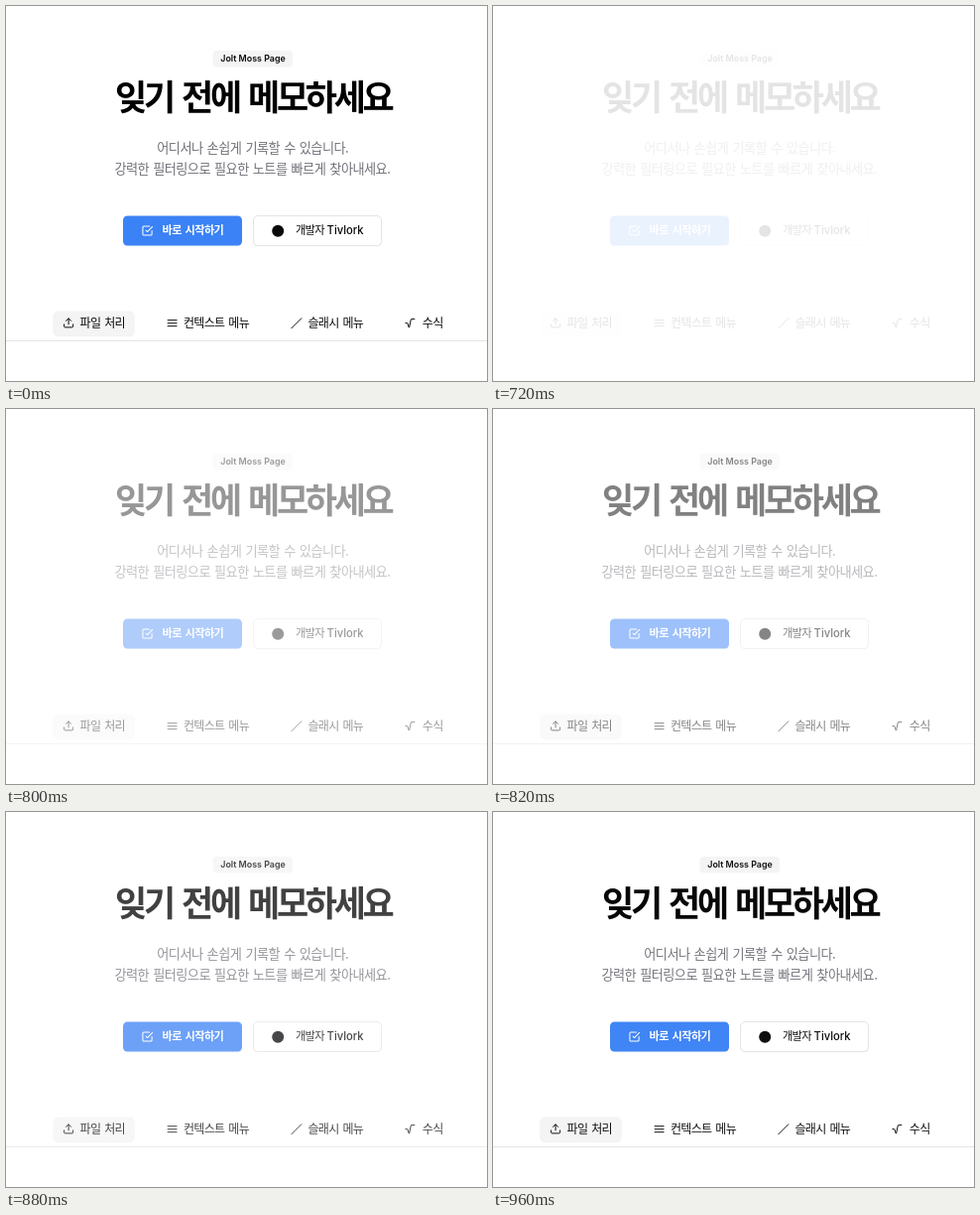
Animation, 485 px wide and 378 px high, one loop 1 s. Source, as an HTML page:

```html
<!DOCTYPE html>
<html lang="ko">
<head>
<meta charset="utf-8">
<style>
  html, body { margin: 0; width: 100%; height: 100%; overflow: hidden; background: #fff; }
  svg { display: block; width: 100%; height: 100%; }
  text { font-family: "Noto Sans CJK KR", "Noto Sans CJK", "Noto Sans CJK JP", sans-serif; fill: #09090b; white-space: pre; }
  .latin { font-family: Inter, sans-serif; letter-spacing: 0; word-spacing: 0; }
  .badge { font-size: 8.9px; font-weight: 600; text-anchor: middle; }
  .title { font-size: 35px; font-weight: 700; letter-spacing: -3.3px; word-spacing: 2.7px; fill: #000; }
  .lead { font-size: 13.2px; letter-spacing: -.57px; word-spacing: .95px; fill: #71717a; }
  .btn { font-size: 11.2px; font-weight: 500; letter-spacing: -.6px; word-spacing: 1px; }
  .primary { font-weight: 600; fill: #fff; }
  .tab { font-size: 12px; font-weight: 500; letter-spacing: -.67px; word-spacing: 1.2px; }
  .icon { fill: none; stroke: #09090b; stroke-width: 2; stroke-linecap: round; stroke-linejoin: round; }
  .light { stroke: #fff; }
  .soft { fill: #f4f4f5; }
  .shade { fill: #000; opacity: .06; }
</style>
</head>
<body>
<svg viewBox="0 0 485 378">
  <g id="page">
    <rect class="soft" x="208.5" y="45" width="80.5" height="16.5" rx="4"/>
    <text class="latin badge" x="249" y="56.4">Jolt Moss Page</text>

    <text class="title" x="110" y="104.7">잊기 전에 메모하세요</text>
    <text class="lead" x="152.3" y="148.2">어디서나 손쉽게 기록할 수 있습니다.</text>
    <text class="lead" x="109.4" y="169.2">강력한 필터링으로 필요한 노트를 빠르게 찾아내세요.</text>

    <rect class="shade" x="118" y="212.3" width="120" height="30" rx="4.5"/>
    <rect x="118" y="211.5" width="120" height="30" rx="4.5" fill="#3b82f6"/>
    <path class="icon light" transform="translate(136.4 220.4) scale(.51)"
      d="M9 11l3 3L22 4M21 12v7a2 2 0 0 1-2 2H5a2 2 0 0 1-2-2V5a2 2 0 0 1 2-2h11"/>
    <text class="btn primary" x="157.6" y="230.1">바로 시작하기</text>

    <rect class="shade" x="249" y="212.3" width="130" height="30" rx="4.5"/>
    <rect x="249.5" y="211.5" width="129" height="30" rx="4.5" fill="#fff" stroke="#e4e4e7"/>
    <circle cx="274.2" cy="226.7" r="6" fill="#09090b"/>
    <text class="btn" x="291.9" y="230.1">개발자<tspan class="latin" x="323.6" y="230.1">Tivlork</tspan></text>

    <rect class="shade" x="47.5" y="308.3" width="82" height="25" rx="5"/>
    <rect class="soft" x="47.5" y="307.5" width="82" height="25" rx="5"/>
    <path class="icon" transform="translate(57.1 313.4) scale(.5)"
      d="M21 15v4a2 2 0 0 1-2 2H5a2 2 0 0 1-2-2v-4M17 8l-5-5-5 5M12 3v12"/>
    <text class="tab" x="74.6" y="323.8">파일 처리</text>
    <path class="icon" transform="translate(161.6 313.7) scale(.5)" d="M3 6h18M3 12h18M3 18h18"/>
    <text class="tab" x="179" y="323.8">컨텍스트 메뉴</text>
    <path class="icon" transform="translate(286.8 313.8) scale(.5)" d="M22 2L2 22"/>
    <text class="tab" x="304.5" y="323.8">슬래시 메뉴</text>
    <path class="icon" transform="translate(401.4 313.6) scale(.5)"
      d="M3 12h3.28a1 1 0 0 1 .948.684l2.298 7.934a.5.5 0 0 0 .96-.044L13.82 4.771A1 1 0 0 1 14.792 4H21"/>
    <text class="tab" x="419.8" y="323.8">수식</text>

    <path d="M0 337.5H485" stroke="#e4e4e7"/>
  </g>
</svg>
<script>
  const LOOP = 1000, HIDE = 480, SHOW = 720, LAST = 960, STEP = 20;
  const page = document.getElementById("page");

  // Fade-in follows an ease-in-out curve, sampled every STEP ms.
  function opacityAt(t) {
    if (t < HIDE) return 1;
    if (t < SHOW) return 0;
    const held = Math.min(LAST, Math.floor(t / STEP) * STEP);
    const u = (held - 650) / 342;
    return u * u * (3 - 2 * u);
  }

  const start = performance.now();
  function draw() {
    const t = Math.max(0, performance.now() - start) % LOOP;
    page.setAttribute("opacity", opacityAt(t).toFixed(3));
    requestAnimationFrame(draw);
  }
  draw();
</script>
</body>
</html>
```
